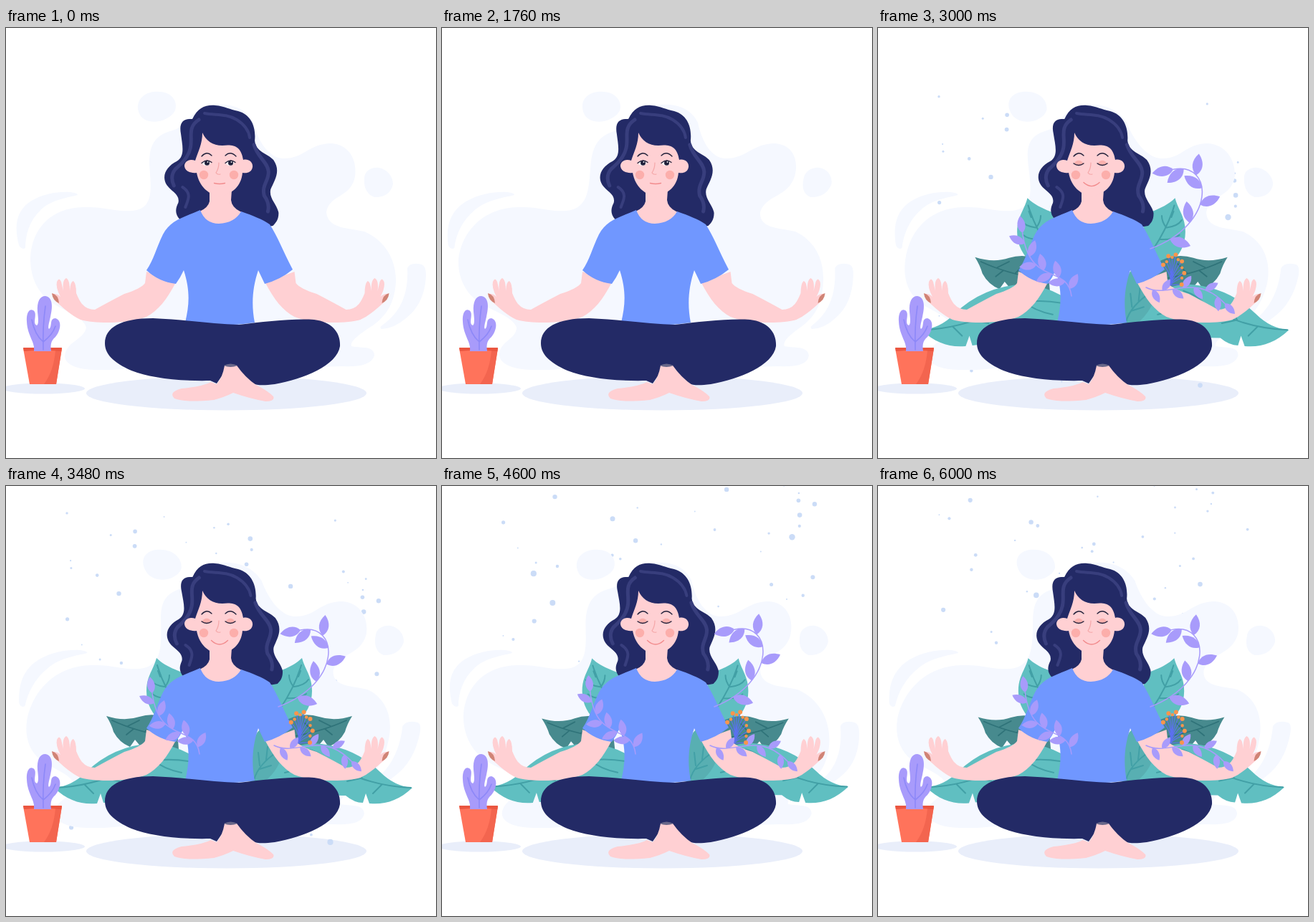
An HTML page that plays this animation: 600 px wide and 600 px high, repeating every 6040 ms.

```html
<!DOCTYPE html>
<html lang="en">
<head>
<meta charset="utf-8">
<title>Calm meditation</title>
<style>
  html, body { margin: 0; width: 100%; height: 100%; overflow: hidden; background: #fff; }
  svg { display: block; width: 100vw; height: 100vh; }
  .line { fill: none; stroke-linecap: round; stroke-linejoin: round; }
  .skin { fill: #ffd0d3; }
  .navy { fill: #232a66; }
  .shine { stroke: #383e7d; }
  .lash { stroke: #20203a; stroke-width: 1.3; }
  .vein { stroke: #42a0a6; stroke-width: 2; }
  .dark { stroke: #2f7379; stroke-width: 1.8; }
  .twig { stroke: #5b70ef; stroke-width: 1.2; }
  .purple { fill: #a89bfb; }
  .stem { stroke: #a89bfb; stroke-width: 1.5; }
</style>
</head>
<body>
<svg viewBox="0 0 600 600">
  <ellipse cx="307.5" cy="509.5" rx="195.5" ry="24" fill="#e9eefa"/>
  <ellipse cx="52" cy="503" rx="58" ry="7.5" fill="#e9eefa"/>
  <g id="dots" fill="#cbdcf7"></g>
  <g id="blobs" fill="#f5f8ff"></g>
  <g id="foliage"></g>

  <g id="hair">
    <path class="navy" d="M260,127 C268,111 278,107 292,108 C306,109 312,114 324,116 C342,121 349,138 347,157 C348,173 365,175 373,184 C384,200 374,213 369,225 C366,238 378,246 380,258 C380,268 376,272 372,276 L320,285 L262,285 L242,267 C235,259 236,252 240,244 C243,232 230,228 224,219 C216,206 224,193 238,186 C250,179 246,164 244,148 C241,132 247,126 260,127Z"/>
    <g class="line shine" stroke-width="5">
      <path d="M269,128 C252,139 261,153 257,168 C254,181 244,190 236,197 Q228,207 234,220"/>
      <path d="M346,163 C351,181 365,187 366,200 C367,213 356,219 360,234 Q368,245 365,256"/>
      <path d="M246,222 C260,231 253,241 250,250" stroke-width="4"/>
      <path d="M277,119 C292,122 307,119 322,128 Q338,138 340,153" stroke-width="4"/>
    </g>
  </g>

  <path class="skin" d="M284,226 L284,242 Q282,251 270,256 Q277,276 298,276 Q322,275 329,257 Q315,251 314,240 L315,226Z"/>
  <path class="skin" d="M274,146 C279,157 288,164 302,164 C318,162 328,165 331,184 C338,182 345,187 344,194 C343,201 337,203 330,202 C328,222 315,231 298,236 C282,231 270,222 266,202 C258,203 250,200 249,193 C249,186 256,182 264,185 C268,172 274,162 274,146Z"/>
  <circle cx="276" cy="205" r="6.2" fill="#fcaeab"/>
  <circle cx="318" cy="205" r="6.2" fill="#fcaeab"/>
  <g class="line lash">
    <path d="M273,179 Q280,171 287,178"/>
    <path d="M306,178 Q313,171 321,179"/>
  </g>
  <g id="open">
    <g id="eye">
      <ellipse cx="279.5" cy="188.5" rx="5.5" ry="3.5" fill="#fff"/>
      <circle cx="280.5" cy="188.3" r="3.5" fill="#20203a"/>
      <circle cx="281.5" cy="187" r=".9" fill="#fff"/>
      <path class="line lash" d="M273,188.5 Q280,182 287,187.5"/>
    </g>
    <use href="#eye" x="33"/>
  </g>
  <g id="lids">
    <g id="lid">
      <path d="M273,189 Q280,180.5 287,189 Q280,194 273,189Z" fill="#f9b0ad"/>
      <path class="line lash" d="M273,189 Q280,194 287,189"/>
    </g>
    <use href="#lid" x="33"/>
  </g>
  <path class="line" d="M297,188 Q297,196 293,202 Q295,205 299,204" stroke="#f5a7a8" stroke-width="1.2"/>
  <path id="mouth" class="line" stroke="#f28b8d" stroke-width="1.4"/>

  <g id="arm">
    <path class="skin" d="M196,340 L237,355 C225,378 212,395 196,403 C170,413 125,413 104,407 C92,402 79,390 67,379 L64,371 Q71,370 76,375 Q69,362 71,354 Q74,347 77,354 L80,367 Q78,352 84,349 Q89,351 89,367 Q90,353 94,353 Q98,357 98,370 Q102,380 106,385 Q113,393 124,393 Q140,384 165,371 Q188,364 194,356Z"/>
    <path d="M64,370 Q73,372 74,384 Q65,380 64,370Z" fill="#d08476"/>
  </g>
  <use href="#arm" transform="translate(598.5) scale(-1 1)"/>
  <path fill="#7097ff" d="M271,254 Q278,273 297,273 Q319,272 328,256 C345,262 358,267 368,274 C379,291 386,310 400,337 Q383,351 361,357 L352,338 C344,362 342,385 347,411 Q300,418 250,411 C256,386 257,366 248,338 Q243,349 237,357 Q213,354 196,338 C206,324 210,306 219,288 C229,268 248,264 271,254Z"/>
  <path class="navy" d="M138,440 C138,418 160,405 205,405 C250,407 290,413 325,414 C360,410 400,405 430,407 C455,410 467,425 466,444 C462,471 415,490 375,497 C350,500 345,498 330,488 L315,478 L305,480 L294,496 L285,492 C240,493 200,488 175,478 C150,467 138,455 138,440Z"/>
  <path class="skin" d="M305,471 Q302,488 294,497 L286,494 Q275,500 245,503 Q226,508 235,517 Q250,523 290,519 Q305,515 317,509 Q340,517 362,521 Q376,521 373,514 Q365,506 349,498 Q334,488 322,471Z"/>
  <path d="M304,471 Q313,466 323,471 Q313,475 304,471Z" fill="#686789"/>

  <g id="fronds"></g>

  <path d="M24,447 L78,447 L70,497 L33,497Z" fill="#ff735b"/>
  <path d="M69,449 L78,447 L70,497 L53,497 Q67,478 69,449Z" fill="#f3654f"/>
  <path d="M24,446 H78 L77,451 Q51,448 25,451Z" fill="#ea5640"/>
  <path class="purple" d="M39,451 C41,438 30,430 29,410 C28,397 33,391 38,394 C45,398 36,412 43,415 C46,413 45,405 44,396 C43,382 47,374 55,374 C66,376 65,390 62,403 C60,412 58,418 60,420 C65,417 60,405 69,405 C79,408 76,423 69,431 C62,437 62,443 63,451Z"/>
  <path class="line" d="M52,449 Q51,415 55,388 M52,438 Q40,428 36,407 M52,438 Q65,428 69,416" stroke="#8d88f8" stroke-width="1.6"/>
</svg>
<script>
const LOOP = 6040, TAU = 2 * Math.PI;
const $ = id => document.getElementById(id);
const clamp = v => Math.min(1, Math.max(0, v));
const ramp = (t, a, b) => { const p = clamp((t - a) / (b - a)); return p * p * (3 - 2 * p); };
const cycle = (t, peak, period) => Math.cos(TAU * (t - peak) / period);
const add = (parent, name, attrs) => {
  const el = document.createElementNS("http://www.w3.org/2000/svg", name);
  for (const k in attrs) el.setAttribute(k, attrs[k]);
  return parent.appendChild(el);
};
const show = (el, on) => el.setAttribute("visibility", on ? "inherit" : "hidden");

// Backdrop shapes, rippled sideways by a wave that travels upwards.
const blobs = [
  "M200,190 C200,165 206,150 232,143 C252,138 255,115 285,108 C315,103 336,113 345,132 C352,160 368,181 386,182 C416,183 422,161 454,161 C480,163 490,185 487,207 C482,237 451,232 447,257 C449,281 480,279 500,284 C530,297 545,325 544,355 C542,385 530,402 512,415 C492,428 480,437 482,444 C496,447 514,443 514,457 C510,471 490,473 470,472 L250,478 C205,466 170,478 135,477 C108,478 83,473 82,458 C84,437 108,436 112,418 C108,402 82,396 62,382 C42,367 34,345 34,322 C35,283 60,251 108,250 C138,249 154,257 176,255 C208,252 202,222 200,190Z",
  "M100,233 C100,227 60,225 34,242 C12,257 12,280 18,303 Q22,310 27,307 C27,285 35,262 57,247 C73,238 85,237 100,233Z",
  "M560,335 Q564,326 580,330 Q586,332 586,345 C585,372 575,392 558,405 Q542,419 524,420 Q520,418 526,414 C548,398 562,375 560,335Z",
  "M184,112 C183,95 200,87 215,89 C232,90 240,103 236,115 C230,127 212,133 200,130 C190,128 185,121 184,112Z",
  "M500,210 C500,198 512,194 520,195 C532,197 540,207 540,218 C537,232 525,237 514,236 C503,232 499,222 500,210Z"
].map(d => ({ d, el: add($("blobs"), "path", {}) }));
const wave = (y, t) => 8.2 * cycle(t, 1550 - 5.2 * (y - 110), 2400);
const ripple = (d, t) => d.replace(/(-?[\d.]+),(-?[\d.]+)/g,
  (_, x, y) => (+x + wave(+y, t) - wave(+y, 0)).toFixed(2) + "," + y);

// Specks scattered by a seeded generator; all rise at one speed.
let seed = 11;
const random = () => (seed = seed * 16807 % 2147483647) / 2147483647;
const dots = Array.from({ length: 100 }, (_, i) => {
  const x = 85 + 435 * random(), r = 0.9 + 3.3 * random() ** 1.7;
  return { y: 38 + 5.1 * i, el: add($("dots"), "circle", { cx: x.toFixed(1), r: r.toFixed(1) }) };
});

// Plants: each grows from its root, then sways.
const plants = [];
function plant(parent, root, delay, sway, markup, mirror) {
  const side = mirror ? add(parent, "g", { transform: `translate(${mirror}) scale(-1 1)` }) : parent;
  const el = add(side, "g", {});
  el.innerHTML = markup;
  plants.push({ el, root, delay, sway });
}
const line = (d, cls) => `<path class="line ${cls}" d="${d}"/>`;
const shape = (d, fill) => `<path d="${d}" fill="${fill}"/>`;

function leaf(x, y, angle, length) {
  const w = length * 0.31, a = length * 0.25, b = length * 0.65;
  return `<path class="purple" transform="translate(${x} ${y}) rotate(${angle * 360 / TAU})"
    d="M0,0 C${a},${w} ${b},${w} ${length},0 C${b},${-w} ${a},${-w} 0,0Z"/>`;
}
// A curved stem with leaves on alternate sides and one at its end.
function frond([x0, y0, x1, y1, x2, y2, x3, y3], count, length) {
  const at = (a, b, c, d, p) => {
    const q = 1 - p;
    return q * q * q * a + 3 * q * q * p * b + 3 * q * p * p * c + p * p * p * d;
  };
  const point = p => [at(x0, x1, x2, x3, p), at(y0, y1, y2, y3, p)];
  let markup = line(`M${x0},${y0} C${x1},${y1} ${x2},${y2} ${x3},${y3}`, "stem");
  for (let i = 0; i <= count; i++) {
    const last = i === count, p = last ? 1 : (i + 0.7) / (count + 0.3);
    const [x, y] = point(p), [bx, by] = point(p - 0.01);
    const turn = last ? 0 : i % 2 ? -0.85 : 0.85;
    markup += leaf(x, y, Math.atan2(y - by, x - bx) + turn, length);
  }
  return markup;
}
// Berries on an arc, each on a bent twig from the root.
function berries(x, y, count) {
  let twigs = "", fruit = "";
  for (let i = 0; i < count; i++) {
    const a = -2.7 + 3.4 * i / (count - 1), k = i % 2 ? 0.88 : 1.05;
    const bx = x + 4 + 15 * k * Math.cos(a), by = y - 18 + 25 * k * Math.sin(a);
    twigs += `M${x},${y} Q${x + 3},${(y + by) / 2} ${bx},${by} `;
    fruit += `<circle cx="${bx}" cy="${by}" r="${i % 2 ? 2.2 : 3}" fill="#fb954c"/>`;
  }
  return line(twigs, "twig") + fruit;
}

const upper = shape("M210,240 C221,251 236,256 250,262 L262,335 L218,330 C204,319 196,304 196,286 C196,265 206,256 210,240Z", "#60bfc1")
  + line("M211,250 Q220,280 240,310 M215,266 L212,258 M221,280 Q206,278 201,270 M230,296 Q212,297 204,290 M222,280 Q228,272 228,264", "vein");
const middle = shape("M140,321 Q165,329 186,322 Q212,314 238,330 L242,380 L190,366 L180,354 L173,364 Q158,358 150,343 Q147,332 140,321Z", "#478a8e")
  + line("M148,327 Q180,342 225,350 M170,335 L186,327 M178,339 L168,347 M194,343 L207,330", "dark");
const lower = shape("M67,421 Q92,419 112,399 Q150,362 205,359 Q255,363 290,400 L290,430 L160,432 Q148,442 136,442 L132,429 L127,443 C105,445 86,439 67,421Z", "#60bfc1")
  + line("M69,421 Q120,419 165,397 Q205,375 260,385 M110,417 L122,429 M140,408 L158,412 M178,390 Q190,374 210,368 M205,382 Q220,395 245,400 M137,408 L145,392", "vein");
const inner = shape("M338,412 Q340,352 354,340 Q364,357 389,364 Q382,396 361,412Z", "#58afb2")
  + line("M346,410 Q352,388 380,370 M354,390 L352,372 M363,382 L365,364 M354,395 L370,390", "vein");

for (const m of [0, 623]) {
  plant($("foliage"), [262, 335], 2600, -0.6, upper, m);
  plant($("foliage"), [270, 355], 2640, -2, middle, m);
  plant($("foliage"), [290, 410], 2600, 0.5, lower, m && m + 11);
}
plant($("foliage"), [345, 412], 2680, 0, inner);
plant($("fronds"), [270, 374], 2640, 2.5, frond([270, 374, 264, 330, 214, 362, 204, 289], 8, 23));
plant($("fronds"), [380, 308], 2680, -2, frond([380, 308, 470, 275, 465, 190, 411, 201], 6, 29));
plant($("fronds"), [374, 362], 2720, 0, frond([374, 362, 405, 378, 440, 340, 482, 384], 7, 20));
plant($("fronds"), [408, 359], 2760, 1, berries(408, 359, 11));

// Growth eases out; a slight overshoot settles at full size.
const grow = p => { const q = clamp(p) - 1; return 1 + 2 * q * q * q + q * q; };

function draw(t) {
  for (const b of blobs) b.el.setAttribute("d", ripple(b.d, t));

  $("dots").setAttribute("opacity", ramp(t, 2600, 2840));
  for (const { y, el } of dots) {
    const now = y - (t - 3480) * 0.1205;
    el.setAttribute("cy", now.toFixed(2));
    show(el, now < 500);
  }

  const swing = t < 3600 ? 0 : 0.5 - 0.5 * cycle(t, 3600, 3000);
  for (const { el, root: [x, y], delay, sway } of plants) {
    const s = grow((t - delay) / 520);
    show(el, t > delay);
    el.setAttribute("transform", `translate(${x} ${y}) rotate(${sway * swing}) scale(${s}) translate(${-x} ${-y})`);
  }

  const lean = (2.7 - 4.5 * cycle(t, 1000, LOOP)) / 150;
  $("hair").setAttribute("transform", `matrix(1 0 ${lean} 1 ${-120 * lean} 0)`);

  const shut = ramp(t, 2000, 2240);
  show($("open"), shut < 1);
  show($("lids"), shut > 0);
  $("lids").setAttribute("transform", `translate(0 184) scale(1 ${shut}) translate(0 -184)`);

  const s = ramp(t, 2600, 3100);
  $("mouth").setAttribute("d", `M${290.5 - 4 * s},${216.5 - s} Q298,${218.5 + 8 * s} ${305.5 + 4 * s},${216.5 - s}`);
}

const start = performance.now();
function tick() {
  draw((performance.now() - start) % LOOP);
  requestAnimationFrame(tick);
}
tick();
</script>
</body>
</html>
```
